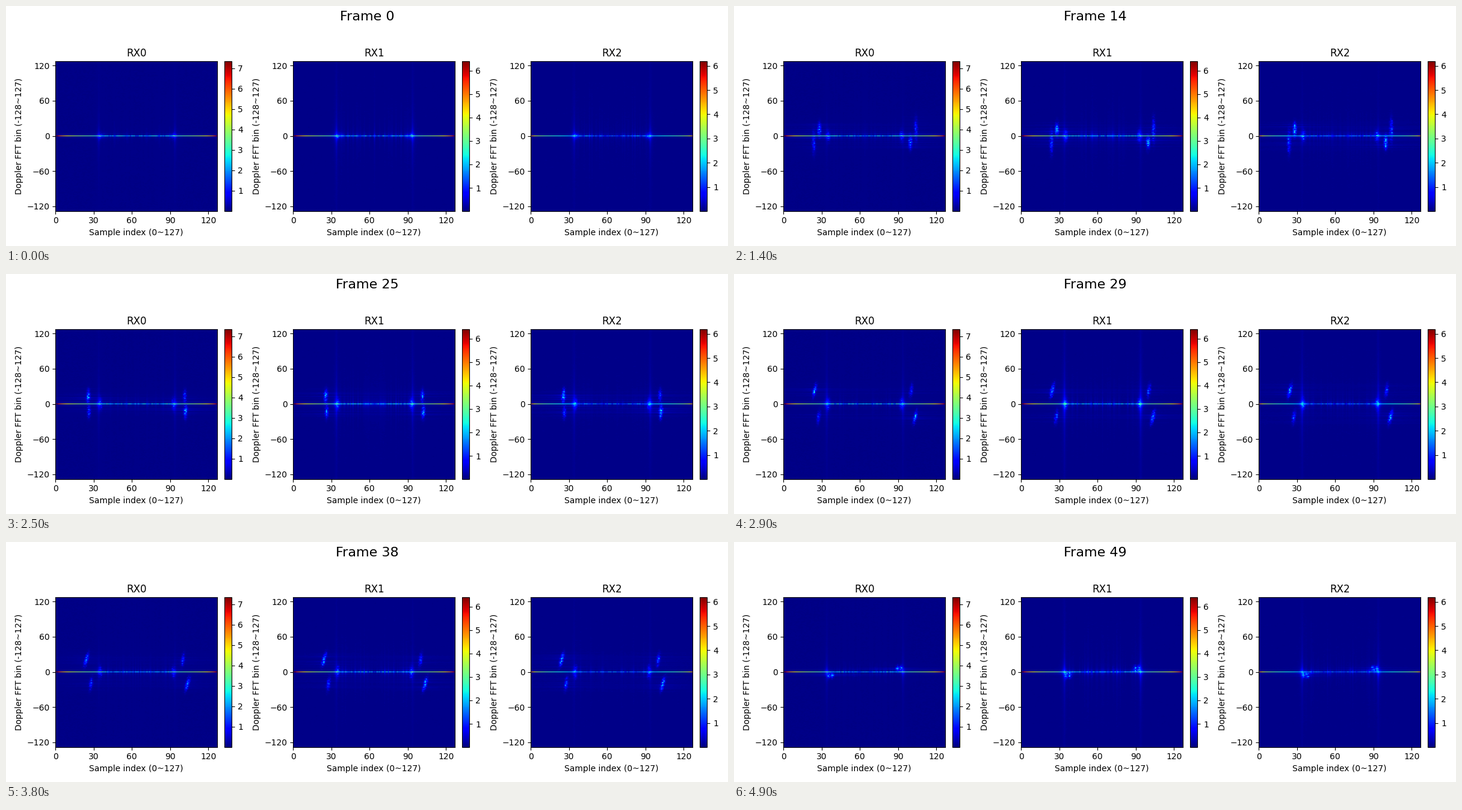
These frames come from a looping animation (1200x400 px, 5 s). A matplotlib script:

```python
import numpy as np
import matplotlib.pyplot as plt
from matplotlib.animation import FuncAnimation

FRAMES, STEP = 50, 100
BINS, ROWS = 128, 256
CYCLE = 48          # frames from one step forward to the next
STILL = 33.8        # range bin of the still target
plt.rcParams["font.family"] = "DejaVu Sans"

# Per receiver: top of the colour scale, top of the zero line, streak gain
RECEIVERS = [(7.33, 7.3, 0.9), (6.39, 6.4, 1.6), (6.18, 4.6, 1.2)]

x = np.arange(BINS)[None, :]
y = np.arange(-ROWS // 2, ROWS // 2)[:, None]
fold = np.minimum(x[0], BINS - x[0])


def ease(t):
    t = np.clip(t, 0, 1)
    return t * t * (3 - 2 * t)


def wave(n, start, period):
    return np.sin(2 * np.pi * (n - start) / period)


def nearness(n):
    """0 at rest, 1 while the mover stands close to the sensor."""
    t = n % CYCLE
    return ease(t / 14) * ease((CYCLE - t) / 9)


def echoes(n):
    """Yield range, doppler, widths, strength and lean of each moving echo."""
    p = nearness(n)
    q = 4 * p * (1 - p)
    body = 36.8 - 11 * p
    drift = -200 * (nearness(n + 0.05) - nearness(n - 0.05)) / 0.1
    swing = p * (16 + 11 * wave(n, 26, 28))
    turn = wave(n, 24, 40)
    wide = 0.8 + 0.7 * q
    lean = 0.14 * max(turn, 0)

    front = drift + swing
    power = 0.25 + 1.35 * np.tanh(abs(front) / 4)
    yield body - 2.2 * turn, front, wide, 3 + 4 * p, power, lean
    yield (body + 2.2 * turn, drift - swing, wide,
           3 + 4 * p + 5 * p * max(-turn, 0), 0.6 * power, lean / 2)
    yield 35.2 + 4 * q, drift, wide, 4 + 2 * p, 0.3 + 0.5 * p, 0
    yield 55.5, 0.6 * drift, wide, 4, 0.1 + 0.5 * q, 0


def mirror(a):
    """Point reflection of the spectrum: (x, y) to (-x, -y)."""
    return np.roll(a[::-1, ::-1], (1, 1), (0, 1))


def zero_line(top, rng):
    v = top * (1 - 0.162 * np.log(np.maximum(fold, 1)))
    ripple = rng.uniform(0.5, 1.15, BINS)[fold]
    mix = np.clip((fold - 28) / 14, 0, 1)
    peak = 0.6 * np.exp(-0.5 * ((fold - STILL) / 1.2) ** 2)
    return v * (1 + mix * (ripple - 1)) + peak


def spectrum(rx, n):
    _, line, gain = RECEIVERS[rx]
    rng = np.random.default_rng(100 * n + rx)
    grain = 0.15 + 0.75 * rng.rayleigh(0.8, (ROWS, BINS)) ** 1.4
    stripes = rng.uniform(0, 1.2, (ROWS, 1)) ** 2

    v = np.zeros((ROWS, BINS))
    for cx, cy, wide, tall, power, lean in echoes(n):
        dx = x - cx - lean * (y - cy)
        band = power * np.exp(-0.5 * ((y - cy) / tall) ** 2)
        v += band * grain * np.exp(-0.5 * (dx / wide) ** 2)
        v += 0.22 * band * stripes / (1 + np.abs(dx) / 4)

    # Still target and weak clutter leak along doppler, fading from zero.
    fade = 1 / (np.abs(y) + 0.6)
    still = gain * (4 + 3.5 * wave(n, 24, 24))
    v += np.log1p(still * fade / (1 + ((x - STILL) / 0.7) ** 2))
    clutter = rng.uniform(0, 1, BINS) ** 4 * (fold > 36)
    v += np.log1p(0.6 * gain * clutter * fade)

    v = v + mirror(v)
    v[ROWS // 2] = np.maximum(zero_line(line, rng), 0.35 * v[ROWS // 2])
    return v + 0.055 + rng.rayleigh(0.01, v.shape)


fig, axes = plt.subplots(1, 3, figsize=(12, 4), dpi=100)
head = fig.suptitle("Frame 0", fontsize=16)
images = []
for i, ax in enumerate(axes):
    im = ax.imshow(spectrum(i, 0), cmap="jet", origin="lower", aspect="auto",
                   extent=[0, 127, -128, 127], vmin=0.01, vmax=RECEIVERS[i][0])
    ax.set(title=f"RX{i}", xlabel="Sample index (0~127)",
           ylabel="Doppler FFT bin (-128~127)",
           xticks=range(0, 121, 30), yticks=range(-120, 121, 60))
    fig.colorbar(im, ax=ax, fraction=0.046, pad=0.04)
    images.append(im)
fig.tight_layout(rect=[0, 0, 1, 0.95])


def draw(n):
    head.set_text(f"Frame {n}")
    for i, im in enumerate(images):
        im.set_data(spectrum(i, n))
    return images


anim = FuncAnimation(fig, draw, frames=FRAMES, interval=STEP,
                     repeat=True, repeat_delay=0, blit=False)
plt.show()
```
